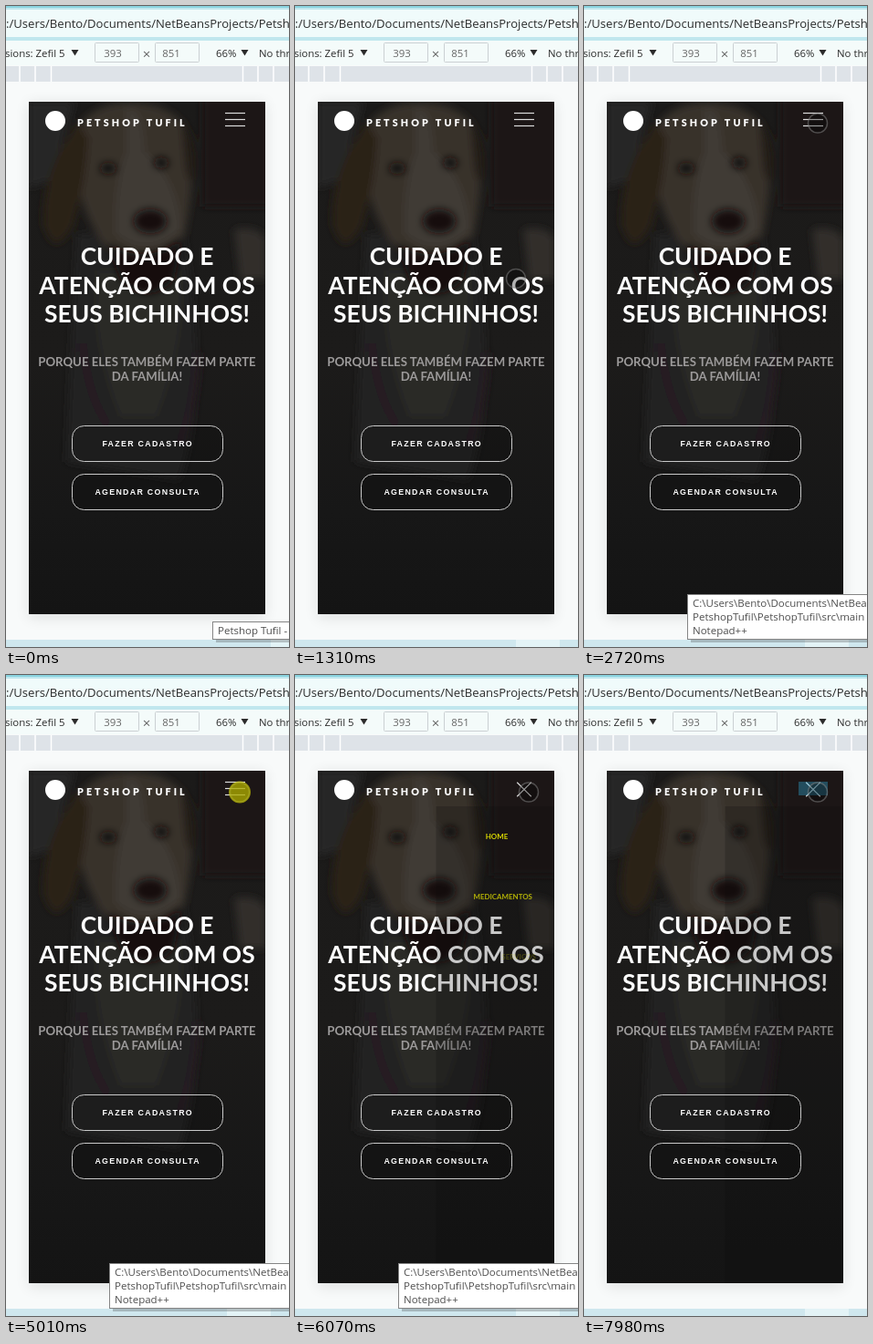
Animation of 310 by 703 pixels, one loop 8 s. Source, as an HTML page:

```html
<!DOCTYPE html>
<html lang="pt">
<head>
<meta charset="utf-8">
<title>Petshop</title>
<style>
  html, body { margin: 0; width: 100%; height: 100%; overflow: hidden; background: #f8fafa; }
  svg { display: block; }
  .ui { font: 11.4px "Open Sans", "Noto Sans", sans-serif; fill: #2b2b2b; }
  .tip text { font-size: 11.5px; fill: #4f4f4f; }
  .tip rect { fill: #fff; stroke: #858585; }
  .mid { text-anchor: middle; }
  .lato { font-family: Lato, sans-serif; font-weight: 700; fill: #fff; }
  .brand { font-weight: 900; font-size: 10.7px; letter-spacing: 3.1px; }
  .button { font: 700 8.8px "Liberation Sans", Arial, sans-serif; letter-spacing: 1.32px; fill: #fff; text-anchor: middle; }
  .button rect { fill: #000; fill-opacity: .15; stroke: #c9c9c9; }
  .menu { font-size: 7.92px; fill: #e2e000; }
  .burger { stroke: #dcdcdc; stroke-width: 1.2; }
</style>
</head>
<body>
<svg width="310" height="703" viewBox="0 0 310 703">
  <defs>
    <clipPath id="screen"><path d="M25 105H284V667H25Z"/></clipPath>
    <filter id="soft" x="-40%" y="-40%" width="180%" height="180%"><feGaussianBlur stdDeviation="4"/></filter>
    <filter id="shadow"><feGaussianBlur stdDeviation="8"/></filter>
    <linearGradient id="base" x2="0" y2="1">
      <stop stop-color="#1b1a19"/><stop offset=".5" stop-color="#1c1b1a"/>
      <stop offset=".8" stop-color="#171717"/><stop offset="1" stop-color="#141414"/>
    </linearGradient>
  </defs>

  <!-- browser bars -->
  <rect width="310" height="703" fill="#f8fafa"/>
  <rect width="310" height="38" fill="#c0e7ee"/>
  <rect width="310" height="2" fill="#8ad4e0"/>
  <rect y="4" width="310" height="30" fill="#f0fbfb"/>
  <rect y="38" width="310" height="27" fill="#f4fbfa"/>
  <g class="ui">
    <text y="24" style="font-size:13.1px">:/Users/Bento/Documents/NetBeansProjects/Petshop</text>
    <text x="-1" y="55.500">sions: Zefil 5</text>
    <g fill="none" stroke="#cbd0d3"><rect x="97.5" y="40.5" width="48" height="21" rx="1"/><rect x="163.5" y="40.5" width="48" height="21" rx="1"/></g>
    <g class="mid" fill="#666"><text x="117" y="55.500">393</text><text x="181" y="55.500">851</text><text x="154" y="58" style="font-size:15px">×</text></g>
    <text x="230" y="55.500">66%</text>
    <text x="277" y="55.500">No throttling</text>
    <path d="M71.500 48h8l-4 6.500zM257.500 48h8l-4 6.500z"/>
  </g>
  <rect y="66" width="310" height="17" fill="#dee3e8"/>
  <path d="M15 66V83M32 66V83M49.500 66V83M259.500 66V83M276 66V83M293 66V83" stroke="#fff" stroke-width="1.500"/>

  <!-- phone -->
  <rect x="25" y="107" width="259" height="564" opacity=".1" filter="url(#shadow)"/>
  <g clip-path="url(#screen)">
    <rect x="25" y="105" width="259" height="562" fill="url(#base)"/>
    <g filter="url(#soft)">
      <path d="M25 105H75L50 190L25 200Z" fill="#262626"/>
      <path d="M215 100H290V220H215Z" fill="#1b1716"/>
      <path d="M250 245Q275 240 284 255V300H256Z" fill="#302d2c"/>
      <path d="M78 250Q70 380 66 500L190 520Q225 420 195 250Z" fill="#232221"/>
      <path d="M100 290Q92 370 125 450L165 450Q200 360 190 290Z" fill="#2a2928"/>
      <path d="M84 370Q90 430 112 460M208 380Q206 440 190 480" fill="none" stroke="#261c23" stroke-width="9"/>
      <path d="M72 150Q85 104 140 106Q192 108 204 150Q206 200 196 250Q155 300 108 262Q78 225 72 150Z" fill="#38312a"/>
      <path d="M132 112Q150 108 152 160Q188 190 192 245Q155 280 120 250Q118 195 132 160Z" fill="#403b35"/>
      <path d="M78 128Q38 185 41 240Q53 280 74 240Q88 190 90 145Z" fill="#2a2019"/>
      <path d="M192 125Q212 145 207 190Q199 200 196 170Z" fill="#241d18"/>
    </g>
    <g fill="#12100f" filter="url(#soft)">
      <ellipse cx="112" cy="178" rx="9" ry="6"/><ellipse cx="170" cy="172" rx="8" ry="6"/>
      <ellipse cx="158" cy="236" rx="18" ry="13"/><path d="M112 262Q155 285 192 256L184 300Q155 330 126 300Z"/>
    </g>

    <circle cx="54" cy="126" r="11" fill="#fff"/>
    <text class="lato brand" x="78" y="132">PETSHOP TUFIL</text>
    <g class="lato mid" font-size="26.4">
      <text x="154.500" y="284">CUIDADO E</text>
      <text x="154.500" y="316">ATENÇÃO COM OS</text>
      <text x="154.500" y="347">SEUS BICHINHOS!</text>
    </g>
    <g class="lato mid" font-size="13.2" style="fill:#9d9b9b">
      <text x="154.500" y="395">PORQUE ELES TAMBÉM FAZEM PARTE</text>
      <text x="154.500" y="411">DA FAMÍLIA!</text>
    </g>

    <rect id="panel" x="154.500" y="144" width="130" height="523" fill="#0c0c0c" opacity=".22"/>
    <g class="button">
      <rect x="72.500" y="460.500" width="165" height="39" rx="13"/><text x="155.200" y="483">FAZER CADASTRO</text>
      <rect x="72.500" y="513.500" width="165" height="39" rx="13"/><text x="155.200" y="536">AGENDAR CONSULTA</text>
    </g>
    <g id="menu" class="lato mid menu">
      <text x="219.600" y="180">HOME</text>
      <text x="219.600" y="246">MEDICAMENTOS</text>
      <text x="219.600" y="312">SERVIÇOS</text>
    </g>
    <g id="burger" class="burger"><path d="M-11 0H11"/><path d="M-11 0H11"/><path d="M-11 0H11"/></g>
    <rect id="tap" x="235" y="117" width="32" height="15" fill="#33b5e5" opacity=".35"/>
    <g id="cursor">
      <circle r="10.500" fill="#000" fill-opacity=".3" stroke="#858585" stroke-opacity=".5" stroke-width="1.500"/>
      <circle id="press" r="12" fill="#c6c400" opacity=".68"/>
    </g>
  </g>

  <!-- taskbar and its tooltips -->
  <rect y="695" width="310" height="8" fill="#cfe7ee"/>
  <rect id="hover" y="695" width="48" height="8" fill="#e3f3f6"/>
  <g id="tipShort" class="ui tip">
    <path d="M230 679H310V698H230Z" opacity=".25"/>
    <rect x="226.500" y="675.500" width="100" height="19"/>
    <text x="232" y="689">Petshop Tufil - Web</text>
  </g>
  <g id="tipLong" class="ui tip">
    <path d="M117 649H310V698H117Z" opacity=".25"/>
    <rect x="113.500" y="645.500" width="220" height="49"/>
    <text x="119" y="659">C:\Users\Bento\Documents\NetBeans</text>
    <text x="119" y="674">PetshopTufil\PetshopTufil\src\main</text>
    <text x="119" y="689">Notepad++</text>
  </g>
</svg>
<script>
const LOOP = 8000, OPEN = 5400, CLOSE = 7970;
const $ = id => document.getElementById(id);
const clamp = v => Math.min(1, Math.max(0, v));
const ramp = (t, start, length) => clamp((t - start) / length);
const show = (el, on) => el.setAttribute('visibility', on ? 'visible' : 'hidden');
const move = (el, x, y, turn = 0) => el.setAttribute('transform', `translate(${x} ${y}) rotate(${turn})`);

// CSS-style cubic-bezier timing, solved by bisection
const bezier = (x1, y1, x2, y2) => x => {
  const at = (a, b, s) => 3 * a * s * (1 - s) ** 2 + 3 * b * s * s * (1 - s) + s ** 3;
  let low = 0, high = 1;
  for (let i = 0; i < 20; i++) {
    const mid = (low + high) / 2;
    if (at(x1, x2, mid) < x) low = mid; else high = mid;
  }
  return at(y1, y2, (low + high) / 2);
};
const ease = bezier(.25, .1, .25, 1), easeIn = bezier(.42, 0, 1, 1);

// time, x, y
const path = [
  [0, 292, 715], [690, 275, 715], [900, 260, 580], [1100, 247, 400], [1310, 242, 299], [1410, 243, 290],
  [1460, 243, 287], [1800, 252, 185], [2050, 255, 144], [2260, 256, 131], [2330, 256, 130], [2720, 256, 128.5], [LOOP, 256, 128.5]
];
function cursorAt(t) {
  const i = path.findIndex(p => p[0] > t), [a, b] = [path[i - 1], path[i]];
  const k = ramp(t, a[0], b[0] - a[0]);
  return [a[1] + (b[1] - a[1]) * k, a[2] + (b[2] - a[2]) * k];
}

function draw(t) {
  move($('cursor'), ...cursorAt(t));
  show($('press'), (t >= 5010 && t < 5190) || (t >= 7800 && t < 7910));
  show($('tap'), (t >= OPEN && t < OPEN + 100) || t >= CLOSE);

  $('hover').setAttribute('x', t < 700 ? 290 : 242);
  $('tipShort').setAttribute('opacity', 1 - ramp(t, 640, 120));
  $('tipLong').setAttribute('opacity', ramp(t, 1730, 150) * (1 - ramp(t, 6150, 150)));

  move($('panel'), 130 * (1 - easeIn(ramp(t, OPEN, 500))), 0);
  [...$('menu').children].forEach((item, i) => {
    const k = t < CLOSE ? ease(ramp(t, OPEN + 300 + i * 1000 / 7, 500)) : 0;
    item.setAttribute('opacity', k);
    move(item, 33 * (1 - k), 0);
  });

  const cross = ease(ramp(t, OPEN, 300));
  [...$('burger').children].forEach((line, i) => {
    const side = i - 1;
    move(line, 251, 124.5 + cross + side * 7 * (1 - cross), side * 45 * cross);
    if (!side) line.setAttribute('opacity', 1 - cross);
  });
}

function tick() {
  draw(performance.now() % LOOP);
  requestAnimationFrame(tick);
}
tick();
</script>
</body>
</html>
```
